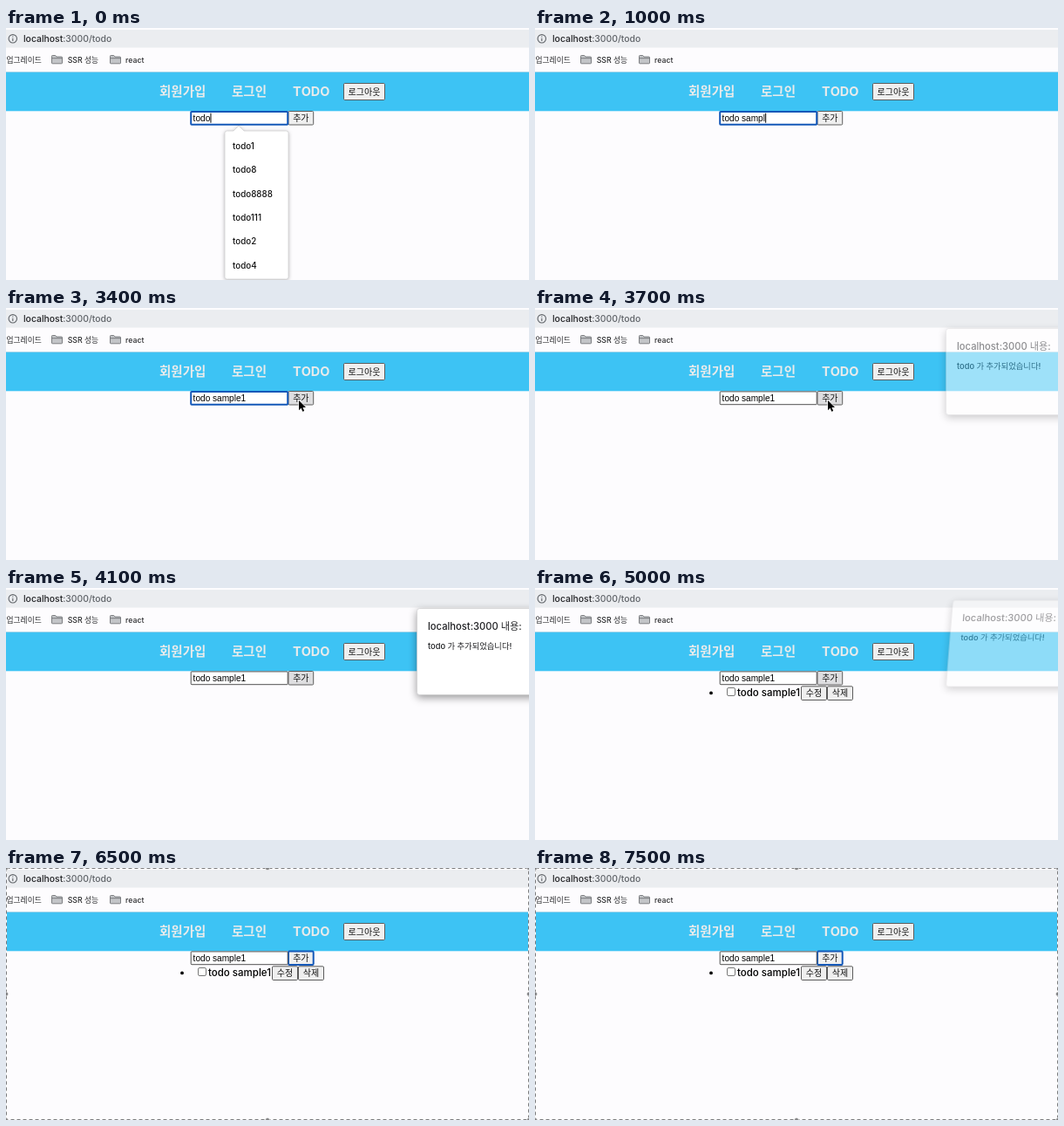
Write an HTML page that moves like this. It is 600 by 289 pixels and loops after 7.7 s.

```html
<!DOCTYPE html>
<html lang="ko">
<head>
<meta charset="utf-8">
<title>TODO</title>
<style>
  html, body { margin: 0; width: 100%; height: 100%; overflow: hidden; background: #fdfcfe; }
  svg { display: block; width: 600px; height: 289px; }
  text { font: 500 10px Inter, 'Noto Sans CJK KR', 'Noto Sans CJK', sans-serif; fill: #111; white-space: pre; }
  text.url { font-size: 10.4px; fill: #202124; }
  text.bookmark { font-size: 8.75px; fill: #2b2c2e; }
  text.nav { font-size: 14.5px; font-weight: 700; font-kerning: none; fill: #e9ebeb; }
  text.field { font: 10.1px 'Liberation Sans', Arial, sans-serif; fill: #000; }
  text.item { font-size: 11.5px; fill: #000; }
  text.option { font-size: 9.8px; }
  text.title { font-size: 11.2px; fill: #202124; }
  text.message { font-size: 9.3px; fill: #202124; }
  .button rect { fill: #efefef; stroke: #5c5c5c; }
  .button.hover rect { fill: #dedee0; }
  .field-box { fill: #fff; stroke: #505050; }
  .button.focus rect, .field-box.focus { stroke: #1458b8; stroke-width: 2; }
  .shadow { filter: drop-shadow(0 1px 2px #0004); }
  .deep-shadow { filter: drop-shadow(0 3px 5px #0006); }
</style>
</head>
<body>
<svg viewBox="0 0 600 289">
  <defs>
    <g id="folder" stroke="#717376" stroke-width=".9" stroke-linejoin="round">
      <path d="M.5 9V1.3Q.5.5 1.3.5H4.7L6 2H11.7Q12.5 2 12.5 2.8V9Q12.5 9.8 11.7 9.8H1.3Q.5 9.8.5 9Z" fill="#c3c5c8"/>
      <path d="M.5 3.7H12.5" fill="none"/>
    </g>
    <path id="beamShape" d="M-2.5 -5.5Q0 -5.5 0 -4Q0 -5.5 2.5 -5.5M0 -4V4M-2.5 5.5Q0 5.5 0 4Q0 5.5 2.5 5.5M-1.5 2H1.5"/>
  </defs>

  <rect width="600" height="289" fill="#fdfcfe"/>
  <rect y="2" width="600" height="20.5" fill="#ebedf0"/>
  <g fill="none" stroke="#5f6368" stroke-width="1.1">
    <circle cx="7.8" cy="12.3" r="4.7"/>
    <path d="M7.8 11.7V15M7.8 9.4V10.6"/>
  </g>
  <text class="url" x="20" y="16">localhost<tspan fill="#5f6368">:3000/todo</tspan></text>
  <text class="bookmark" x="0.5" y="39.5">업그레이드</text>
  <use href="#folder" x="52" y="31"/>
  <text class="bookmark" x="70.7" y="39.5">SSR 성능</text>
  <use href="#folder" x="119" y="31"/>
  <text class="bookmark" x="137" y="39.5">react</text>
  <rect y="50" width="600" height="1" fill="#d9dde2"/>

  <rect y="50.6" width="600" height="44.7" fill="#3dc3f4"/>
  <text class="nav" x="176" y="77.7">회원가입</text>
  <text class="nav" x="259" y="77.7">로그인</text>
  <text class="nav" x="329" y="77.7">TODO</text>
  <g id="buttons"></g>

  <rect id="field" class="field-box" x="212.2" y="95.9" width="111" height="14.8" rx=".8"/>
  <text id="fieldText" class="field" x="214.6" y="106.6"></text>
  <rect id="caret" y="97.7" width="1" height="11" fill="#000"/>

  <g id="todoItem">
    <circle cx="202" cy="120.4" r="1.9"/>
    <rect x="220.5" y="114.5" width="9" height="9" rx="1.6" fill="#fff" stroke="#767676"/>
    <text class="item" x="232" y="124">todo sample1</text>
  </g>

  <g id="suggestions">
    <path class="shadow" d="M253.5 118H261L267 112L273 118H321.5Q324 118 324 120.5V285.5Q324 288 321.5 288H253.5Q251 288 251 285.5V120.5Q251 118 253.5 118Z" fill="#fff" stroke="#d2d2d4" stroke-width=".8"/>
  </g>

  <g id="dialog">
    <rect class="deep-shadow" x="471.5" y="23.5" width="200" height="99" rx="3" fill="#fff" stroke="#c8c8ca" stroke-width=".6"/>
    <text class="title" x="484" y="47.5">localhost:3000 내용:</text>
    <text class="message" x="484" y="69.6">todo 가 추가되었습니다!</text>
  </g>

  <g id="arrow">
    <path d="M0 0V11.2L2.6 8.8L4.3 12.7L6.2 11.9L4.5 8.1H8Z" stroke="#fff" stroke-width="1.2" paint-order="stroke"/>
  </g>
  <g id="beam" fill="none">
    <use href="#beamShape" stroke="#fff" stroke-width="2.6"/>
    <use href="#beamShape" stroke="#111" stroke-width="1.1"/>
  </g>

  <g id="selection">
    <rect x=".5" y=".5" width="599" height="288" fill="none" stroke="#fff"/>
    <rect x=".5" y=".5" width="599" height="288" fill="none" stroke="#7c7c7e" stroke-dasharray="4 3"/>
  </g>
</svg>
<script>
const LOOP = 7700, STEP = 100;
const $ = id => document.getElementById(id);

function add(parent, tag, attributes, content = '') {
  const node = document.createElementNS('http://www.w3.org/2000/svg', tag);
  for (const name in attributes) node.setAttribute(name, attributes[name]);
  node.textContent = content;
  return parent.appendChild(node);
}

function addButton(parent, x, y, width, height, label) {
  const group = add(parent, 'g', { class: 'button' });
  add(group, 'rect', { x: x + .5, y: y + .5, width: width - 1, height: height - 1, rx: 1.2 });
  add(group, 'text', { x: x + width / 2, y: y + height / 2 + 3.5, 'text-anchor': 'middle' }, label);
  return group;
}

addButton($('buttons'), 387, 63, 48, 20, '로그아웃');
const addTodo = addButton($('buttons'), 323.5, 95, 29.7, 16.5, '추가');
addButton($('todoItem'), 305, 112.3, 30, 16.7, '수정');
addButton($('todoItem'), 335, 112.3, 30, 16.7, '삭제');

['1', '8', '8888', '111', '2', '4'].forEach((suffix, i) =>
  add($('suggestions'), 'text', { class: 'option', x: 260, y: 138.7 + i * 27.4 }, 'todo' + suffix));

for (const x of [0, 300, 600])
  for (const y of [0, 144.5, 289])
    if (x !== 300 || y !== 144.5)
      add($('selection'), 'circle', { cx: x, cy: y, r: 2.5, fill: '#808082', stroke: '#fff', 'stroke-width': .6 });

// Pointer keys: [time, x, y]
const beamPath = [[1900, 306, 106], [2200, 323, 108.5]];
const arrowPaths = [
  [[2300, 329, 109], [2400, 334, 108.5], [2500, 336, 106], [3700, 336, 106], [4100, 602, 104]],
  [[5200, 602, 118], [5600, 457.5, 148], [6400, 457.5, 148]],
];

const between = (t, start, end) => t >= start && t < end;
const show = (node, visible) => node.setAttribute('visibility', visible ? 'visible' : 'hidden');

function follow(path, t) {
  const i = Math.max(1, path.findIndex(key => key[0] >= t));
  const [t0, x0, y0] = path[i - 1], [t1, x1, y1] = path[i];
  const p = (t - t0) / (t1 - t0), ease = p * p * (3 - 2 * p);
  return `translate(${x0 + (x1 - x0) * ease} ${y0 + (y1 - y0) * ease})`;
}

function place(node, path, t, end) {
  show(node, between(t, path[0][0], end));
  node.setAttribute('transform', follow(path, Math.min(t, path[path.length - 1][0])));
}

function render(t) {
  const typed = t < 100 ? 4 : t < 600 ? 5 : Math.min(12, 6 + Math.floor((t - 600) / STEP));
  $('fieldText').textContent = 'todo sample1'.slice(0, typed);
  $('caret').setAttribute('x', 214.8 + $('fieldText').getComputedTextLength());
  show($('caret'), t < 1700 || between(t, 2200, 2400) || between(t, 2900, 3400));
  $('field').classList.toggle('focus', t < 3600);
  addTodo.classList.toggle('hover', between(t, 2500, 5100));
  addTodo.classList.toggle('focus', t >= 5100);

  show($('suggestions'), t < 100);
  show($('todoItem'), t >= 5000);
  show($('selection'), t >= 6400);

  // The dialog fades in flat, then lifts and leans while fading out.
  const closing = t >= 5000;
  show($('dialog'), between(t, 3700, 5100));
  $('dialog').setAttribute('opacity', closing ? .42 : t < 3800 ? .5 : 1);
  $('dialog').setAttribute('transform', closing ? 'translate(0 -9.5) translate(472 122.5) skewX(-4.6) translate(-472 -122.5)' : '');

  place($('beam'), beamPath, t, 2300);
  const arrowPath = arrowPaths[t < 4200 ? 0 : 1];
  place($('arrow'), arrowPath, t, arrowPath[arrowPath.length - 1][0]);
}

const start = performance.now();
function tick() {
  const t = (performance.now() - start) % LOOP;
  render(Math.floor(t / STEP) * STEP);
  requestAnimationFrame(tick);
}
tick();
</script>
</body>
</html>
```
